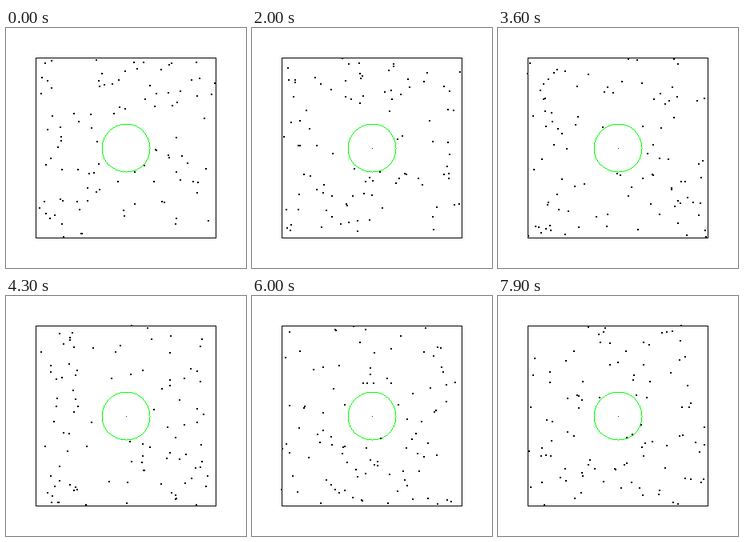
Recreate the animation shown at these times as a matplotlib script. Size 300x300 px, loop 8000 ms.

```python
import numpy as np
import matplotlib.pyplot as plt
from matplotlib.animation import FuncAnimation

SIZE, FRAMES, STEP_MS = 300, 80, 100
LO, HI = 37, 262
CENTRE, RADIUS = 150, 30
COUNT, SPEED, SUBSTEPS = 98, 3.0, 6

WHITE, BLACK = (255, 255, 255), (0, 0, 0)
GREEN, BLUE = (0, 255, 0), (0, 0, 255)


def scatter_gas(rng):
    """Random points in the box, none of them inside the disc."""
    pos = rng.uniform(LO, HI, (COUNT * 2, 2))
    outside = np.hypot(*(pos - CENTRE).T) > RADIUS + 1
    return pos[outside][:COUNT]


def bounce_walls(pos, vel):
    low, high = pos < LO, pos > HI
    pos[low] = 2 * LO - pos[low]
    pos[high] = 2 * HI - pos[high]
    vel[low | high] *= -1


def bounce_disc(pos, vel):
    offset = pos - CENTRE
    dist = np.hypot(*offset.T)
    normal = offset / dist[:, None]
    inward = (vel * normal).sum(axis=1)
    hit = (dist < RADIUS) & (inward < 0)
    vel[hit] -= 2 * inward[hit, None] * normal[hit]
    pos[hit] = CENTRE + normal[hit] * (2 * RADIUS - dist[hit, None])


def simulate():
    rng = np.random.default_rng(11)
    pos = scatter_gas(rng)
    vel = rng.normal(0, SPEED, pos.shape)
    track = []
    for _ in range(FRAMES):
        track.append(pos.copy())
        for _ in range(SUBSTEPS):
            pos += vel / SUBSTEPS
            bounce_walls(pos, vel)
            bounce_disc(pos, vel)
    return track


def draw_circle(img):
    """One-pixel circle whose coordinates are rounded down."""
    reach = int(RADIUS / np.sqrt(2))
    a = np.arange(-reach, reach + 1)
    for sign in (-1, 1):
        b = np.floor(sign * np.sqrt(RADIUS ** 2 - a ** 2)).astype(int)
        img[CENTRE + b, CENTRE + a] = GREEN
        img[CENTRE + a, CENTRE + b] = GREEN


def make_stage():
    img = np.full((SIZE, SIZE, 3), WHITE, dtype=np.uint8)
    img[[LO, HI], LO:HI + 1] = BLACK
    img[LO:HI + 1, [LO, HI]] = BLACK
    draw_circle(img)
    return img


stage = make_stage()
track = simulate()

fig = plt.figure(figsize=(3, 3), dpi=100, facecolor="white")
ax = fig.add_axes([0, 0, 1, 1])
ax.axis("off")
view = ax.imshow(stage, interpolation="nearest", aspect="auto")


def draw(frame):
    img = stage.copy()
    if frame > 0:
        img[CENTRE, CENTRE] = BLUE
    x, y = track[frame].astype(int).T
    for dx in (-1, 0):
        for dy in (-1, 0):
            img[y + dy, x + dx] = BLACK
    view.set_data(img)
    return [view]


anim = FuncAnimation(fig, draw, frames=FRAMES, interval=STEP_MS,
                     repeat=True, repeat_delay=0, blit=False)
plt.show()
```
